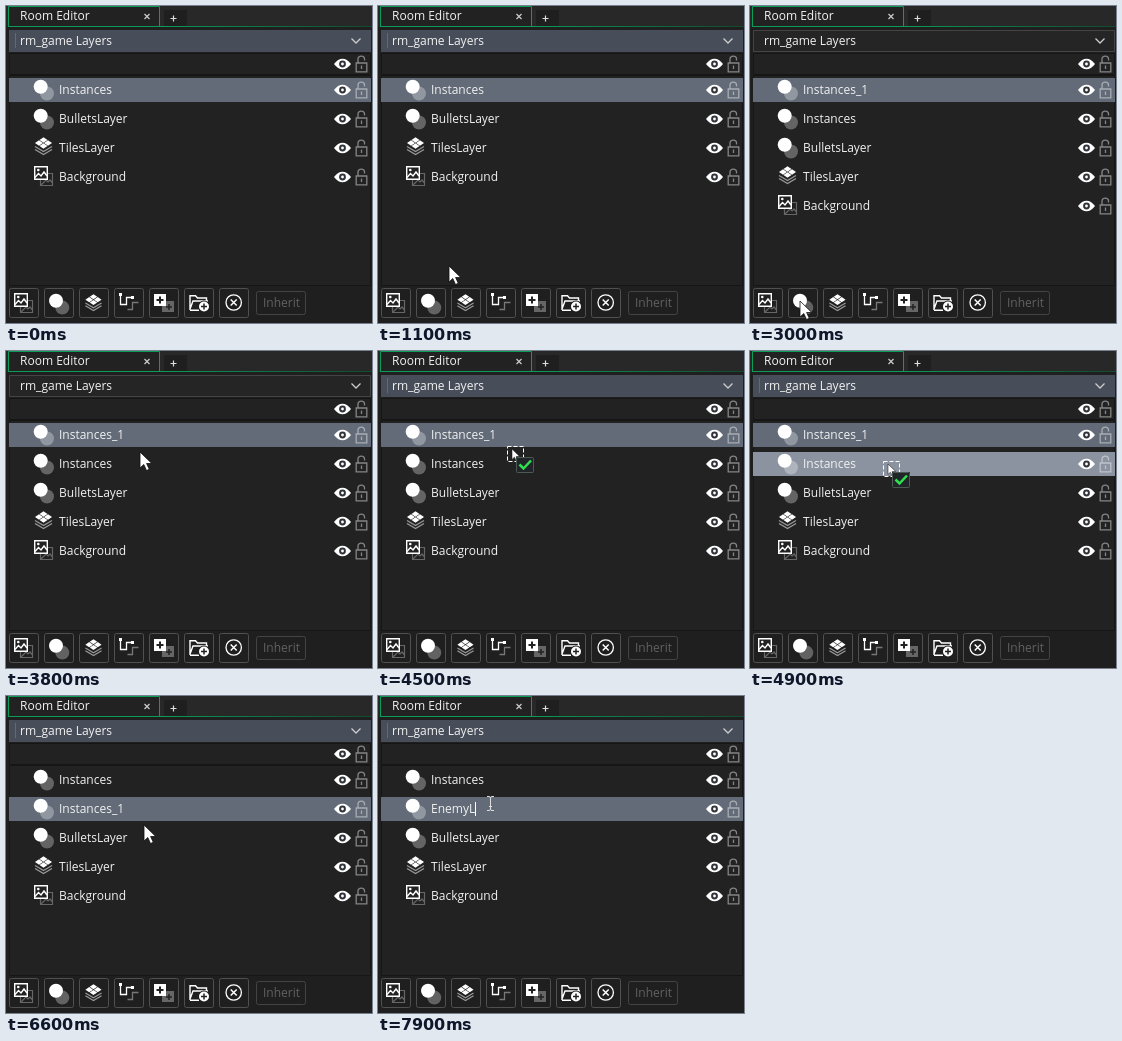
Recreate the animation shown at these times as an HTML page with a canvas. Size 366 by 317 pixels, loop 8 s.

```html
<!DOCTYPE html>
<html lang="en">
<head>
<meta charset="utf-8">
<title>Room Editor layers</title>
<style>
html, body { margin: 0; width: 100%; height: 100%; overflow: hidden; background: #222; }
canvas { display: block; }
</style>
</head>
<body>
<canvas id="stage" width="366" height="317"></canvas>
<script>
const g = document.getElementById('stage').getContext('2d');
const WHITE = '#fff', GRAY = 'rgba(255,255,255,.3)', LOCK = 'rgba(255,255,255,.45)';
const BG = '#222', EDGE = '#161616', GREEN = '#0a9c58';
const SELECTED = '#626b77', TARGET = '#8b92a0';

// Pointer path: step (tenths of a second), x, y
const PATH = [
  [1, 331, 210], [9, 82, 243], [15, 50, 295], [30, 50, 295], [38, 134, 101],
  [40, 131, 86], [42, 131, 86], [49, 138, 113], [50, 138, 121], [52, 138, 132],
  [56, 136, 137], [59, 136, 136], [60, 138, 125], [61, 138, 129], [66, 138, 129],
  [70, 112, 107], [80, 112, 107]
];

function pointerAt(step) {
  const i = Math.max(1, PATH.findIndex(p => p[0] >= step));
  const [s0, x0, y0] = PATH[i - 1], [s1, x1, y1] = PATH[i];
  const k = (step - s0) / (s1 - s0);
  return [Math.round(x0 + (x1 - x0) * k), Math.round(y0 + (y1 - y0) * k)];
}

function box(x, y, w, h, color) {
  g.fillStyle = color;
  g.fillRect(x, y, w, h);
}
function frame(x, y, w, h, color, r = 0) {
  g.strokeStyle = color;
  g.lineWidth = 1;
  g.beginPath();
  g.roundRect(x + .5, y + .5, w - 1, h - 1, r);
  g.stroke();
}
function text(s, x, y, color = '#f2f2f2') {
  g.font = '12px "Open Sans", "Noto Sans", sans-serif';
  g.fillStyle = color;
  g.fillText(s, x, y);
}
function disc(x, y, r, color) {
  g.fillStyle = color;
  g.beginPath();
  g.arc(x, y, r, 0, 7);
  g.fill();
}
function line(d, color, width = 1) {
  g.strokeStyle = color;
  g.lineWidth = width;
  g.stroke(new Path2D(d));
}
function fill(d, color) {
  g.fillStyle = color;
  g.fill(new Path2D(d));
}
function at(x, y, draw, scale = 1) {
  g.save();
  g.translate(x, y);
  g.scale(scale, scale);
  draw();
  g.restore();
}

// Icons: the first three are shared by the list and the toolbar
function discs() {
  disc(14, 15.5, 7, GRAY);
  disc(7.7, 8.7, 7, WHITE);
}
function tiles() {
  line('M2 13.5L10.5 18.5L19 13.5M2 10.5L10.5 15.5L19 10.5', '#999', 1.3);
  for (const [x, y] of [[10.5, 4], [6, 7], [15, 7], [10.5, 10]])
    fill(`M${x - 4} ${y}L${x} ${y - 2.7}L${x + 4} ${y}L${x} ${y + 2.7}Z`, WHITE);
}
function picture() {
  line('M7.5 8.5H19.5V20.5H7.5ZM8 20L13 15L15 17L17 15L19.5 18', '#666', 1.2);
  box(1, 1, 14, 14, BG);
  line('M1.7 1.7H14.3V14.3H1.7Z', WHITE, 1.4);
  line('M2 12.5L5.5 8.5L8 11L11 7L14 11', WHITE, 1.4);
  disc(5.3, 5, 1.3, WHITE);
}
function plus(x, y, r, color, width = 1.5) {
  line(`M${x - r} ${y}H${x + r}M${x} ${y - r}V${y + r}`, color, width);
}
function path() {
  line('M6.5 6V16.5H12.5V9.5H19', WHITE, 1.3);
  line('M13.5 21.5H18.5V14.5H24.5', '#777', 1.3);
  box(5, 5, 3, 3, WHITE);
  box(17, 8, 3, 3, WHITE);
}
function squares() {
  box(13, 13, 12, 11, '#666');
  plus(20, 19, 3, BG);
  box(5, 6, 12, 12, WHITE);
  plus(11, 12, 3.5, BG, 2);
}
function folder() {
  line('M6 22V7.7H11.5L13.5 10H22.5V13M6 22.3H15M6 21L9 13H24', WHITE, 1.4);
  disc(20, 18.5, 6, '#1f1f1f');
  disc(20, 18.5, 5, WHITE);
  plus(20, 18.5, 3, BG);
}
function cross() {
  g.beginPath();
  g.arc(14.7, 14.5, 7.7, 0, 7);
  g.strokeStyle = WHITE;
  g.lineWidth = 1.3;
  g.stroke();
  line('M11.7 11.5L17.7 17.5M17.7 11.5L11.7 17.5', WHITE, 1.5);
}
const BUTTONS = [
  () => at(4, 4, picture), () => at(4.3, 4.1, discs), () => at(4.5, 5, tiles, .95),
  path, squares, folder, cross
];

function eyeAndLock(y) {
  at(336.5, y, () => {
    fill('M-8.5 0Q-4.5 -5.3 0 -5.3T8.5 0Q4.5 5.3 0 5.3T-8.5 0Z', WHITE);
    disc(0, 0, 3.4, '#30343a');
    disc(0, 0, 1.4, WHITE);
  });
  at(349.5, y - 9, () => {
    line('M2.5 8V4Q2.5 1.2 5.8 1.2T9 4V5.5M.7 8H11.3V16.8H.7ZM6 10.5V14', LOCK, 1.3);
  });
}

function tabs() {
  box(0, 0, 366, 21, '#282828');
  box(3, 1, 150, 19, BG);
  box(158, 4, 23, 16, '#1f1f1f');
  const fading = g.createLinearGradient(153, 0, 366, 0);
  fading.addColorStop(0, GREEN);
  fading.addColorStop(1, '#124a30');
  line('M2.5 20.5V.5H153.5V20.5', GREEN);
  line('M2 20.5H366', fading);
  text('Room Editor', 14, 14);
  line('M138.5 8L143.5 13M143.5 8L138.5 13', '#ccc', 1.2);
  plus(167.5, 12.5, 3, '#ddd', 1.2);
}

function panel(focused) {
  box(0, 0, 366, 317, '#1f1f1f');
  tabs();
  box(3, 24, 362, 22, focused ? '#474d59' : '#252525');
  if (focused) box(9, 27, 1, 15, GREEN);
  else frame(3, 24, 362, 22, '#444');
  text('rm_game Layers', 14, 39);
  line('M345.5 32.5L350 37L354.5 32.5', '#ccc', 1.3);
  box(3, 47, 362, 233, BG);
  frame(3, 47, 362, 22, EDGE);
  frame(3, 69, 362, 211, EDGE);
  eyeAndLock(58);
}

function toolbar(hover) {
  BUTTONS.forEach((icon, i) => {
    const x = 3 + 35 * i, lit = i === 1 && hover > 0;
    box(x, 282, 30, 30, '#1f1f1f');
    if (lit) box(x, 282, 30, 30, `rgba(125,132,146,${hover})`);
    frame(x, 282, 30, 30, lit ? '#d8dbe0' : '#505050', 2);
    at(x, 282, icon);
  });
  frame(250, 285, 50, 24, '#444', 2);
  text('Inherit', 257, 301, '#616161');
}

function layers(names, selected, target, caret) {
  names.forEach((name, i) => {
    const y = 72 + 29 * i;
    const color = i === target ? TARGET : i === selected ? SELECTED : null;
    if (color) box(3, y, 362, 24, color);
    const icon = name === 'TilesLayer' ? tiles : name === 'Background' ? picture : discs;
    at(27, y, icon);
    text(name, 53, y + 16);
    if (caret && i === selected)
      box(Math.round(53 + g.measureText(name).width), y + 5, 1, 14, WHITE);
    eyeAndLock(y + 12);
  });
}

function arrow() {
  const d = 'M0 0V16L3.8 12.5L6.5 18.5L9.3 17.3L6.6 11.5H11.8Z';
  fill(d, WHITE);
  line(d, '#111', .8);
}
function dragArrow() {
  g.setLineDash([4, 2]);
  frame(-5, -3, 17, 16, WHITE);
  g.setLineDash([]);
  at(0, 0, arrow, .65);
  box(4, 8, 18, 16, '#20252a');
  frame(4, 8, 18, 16, '#4c5a52', 1);
  line('M7.5 15.5L11.5 19.5L19 11.5', '#2fe04f', 2.5);
}
function beam() {
  line('M-3 -6.5H-1Q.5 -6.5 .5 -5V6Q.5 7.5 -1 7.5H-3M4 -6.5H2Q.5 -6.5 .5 -5M4 7.5H2Q.5 7.5 .5 6M-1 3.5H2', '#ddd');
}

function tooltip(alpha) {
  g.globalAlpha = alpha;
  box(64, 300, 176, 17, BG);
  box(65, 301, 174, 16, '#eddcb1');
  text('Create New Instance Layer', 80, 315, BG);
  g.globalAlpha = 1;
}

function draw(step) {
  const [x, y] = pointerAt(step);
  const dragging = step >= 43 && step < 60;
  const editing = step >= 71;
  const added = step >= 30, moved = step >= 66;
  const names = ['Instances', 'BulletsLayer', 'TilesLayer', 'Background'];
  const fresh = step >= 74 ? 'EnemyL'.slice(0, step - 73) : 'Instances_1';
  if (added) names.splice(moved ? 1 : 0, 0, fresh);
  const row = Math.floor((y - 70) / 29);
  const target = dragging && row > 0 ? row : -1;
  const fade = from => added ? 0 : Math.min(1, Math.max(0, (step - from) / (20 - from)));

  panel(step < 30 || step >= 42);
  toolbar(fade(13) * .85);
  layers(names, moved ? 1 : 0, target, editing);
  if (fade(16)) tooltip(fade(16));
  if (step >= 1) at(x, y, editing ? beam : dragging ? dragArrow : arrow);
}

const start = performance.now();
function tick() {
  draw(Math.floor((performance.now() - start) % 8000 / 100));
  requestAnimationFrame(tick);
}
tick();
</script>
</body>
</html>
```
